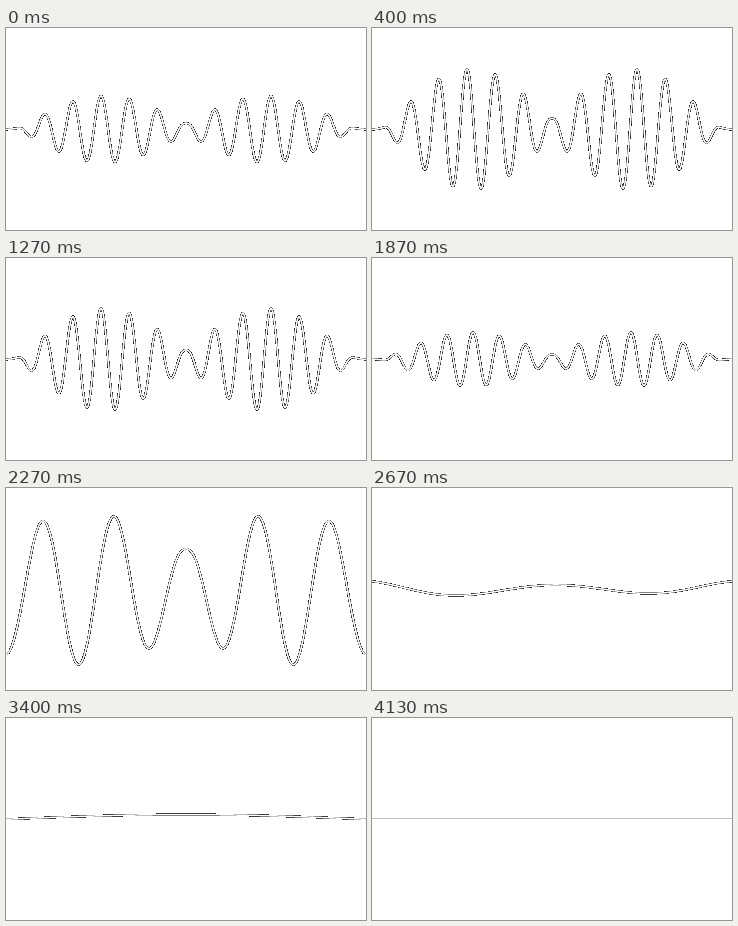
Write an HTML page with a canvas that moves like this. It is 360 by 202 pixels and loops after 4.19 s.

```html
<!DOCTYPE html>
<html lang="en">
<head>
<meta charset="utf-8">
<title>Wave</title>
<style>
  html, body { margin: 0; width: 100%; height: 100%; overflow: hidden; background: #fff; }
  canvas { display: block; width: 360px; height: 202px; }
</style>
</head>
<body>
<canvas id="stage" width="360" height="202"></canvas>
<script>
const W = 360, H = 202, MID = W / 2, BASE = 101.2;
const LOOP = 4190, STEP = 200 / 3;
const UNWIND = 1867, SETTLE = 2667, REST = 3400;
const ctx = document.getElementById('stage').getContext('2d', { willReadFrequently: true });

// 0 to 1 between two times
const progress = (t, from, to) => Math.min(Math.max((t - from) / (to - from), 0), 1);

// Smooth rise and fall around a peak time
function swell(t, peak, half, height) {
  const offset = (t - peak) / half;
  return Math.abs(offset) < 1 ? height * Math.cos(offset * Math.PI / 2) ** 2 : 0;
}

function amplitude(t) {
  const burst = swell(t, 295, 600, 65) + swell(t, 1350, 285, 63.5);
  const release = t < UNWIND - STEP / 2 ? 0 : swell(t, 2160, 490, 77);
  const rebound = swell(t, 3043, 700, 9.55) - swell(t, 3700, 300, 5);
  return burst + release + rebound;
}

// Cycles per half stage: steady at first, then unwinding exponentially
function cycleCount(t) {
  if (t < UNWIND - STEP / 2) return 6.35;
  return 0.125 + 6.715 * Math.exp(-2.591 * (t - UNWIND) / 1000);
}

// Two mirrored lobes with a narrow waist in the middle and soft ends
function lobes(d) {
  const degrees = 5.8 + 1.04 * Math.hypot(d, 4);
  const s = Math.sin(degrees * Math.PI / 180);
  return (s + Math.hypot(s, 0.08)) / 2;
}

function strokeWave(t) {
  const amp = amplitude(t), cycles = cycleCount(t);
  const flat = progress(t, UNWIND, SETTLE);
  const flare = 0.9 * (1 - progress(t, SETTLE, REST));
  const sway = swell(t, SETTLE, 400, 1);
  ctx.clearRect(0, 0, W, H);
  ctx.lineWidth = 1.7;
  ctx.lineJoin = 'round';
  ctx.beginPath();
  for (let x = -1; x <= W + 1; x += 0.5) {
    const d = Math.min(Math.abs(x - MID), MID), u = d / MID;
    const envelope = lobes(d) * (1 - flat) + (1 + flare * u * u) * flat;
    const wave = amp * envelope * Math.cos(2 * Math.PI * cycles * u);
    ctx.lineTo(x, BASE - wave + sway * Math.sin(Math.PI * x / MID));
  }
  ctx.stroke();
}

// White line on a black matte: partly covered pixels turn dark, empty ones stay white
function applyMatte() {
  const image = ctx.getImageData(0, 0, W, H), px = image.data;
  for (let i = 0; i < px.length; i += 4) {
    const cover = px[i + 3];
    px[i] = px[i + 1] = px[i + 2] = cover < 15 ? 255 : cover;
    px[i + 3] = 255;
  }
  ctx.putImageData(image, 0, 0);
}

let shown = -1;
function render(now) {
  const step = Math.floor((now % LOOP) / STEP + 0.1);
  if (step !== shown) {
    shown = step;
    strokeWave(step * STEP);
    applyMatte();
  }
}

const start = performance.now();
function tick() {
  render(performance.now() - start);
  requestAnimationFrame(tick);
}
tick();
</script>
</body>
</html>
```
